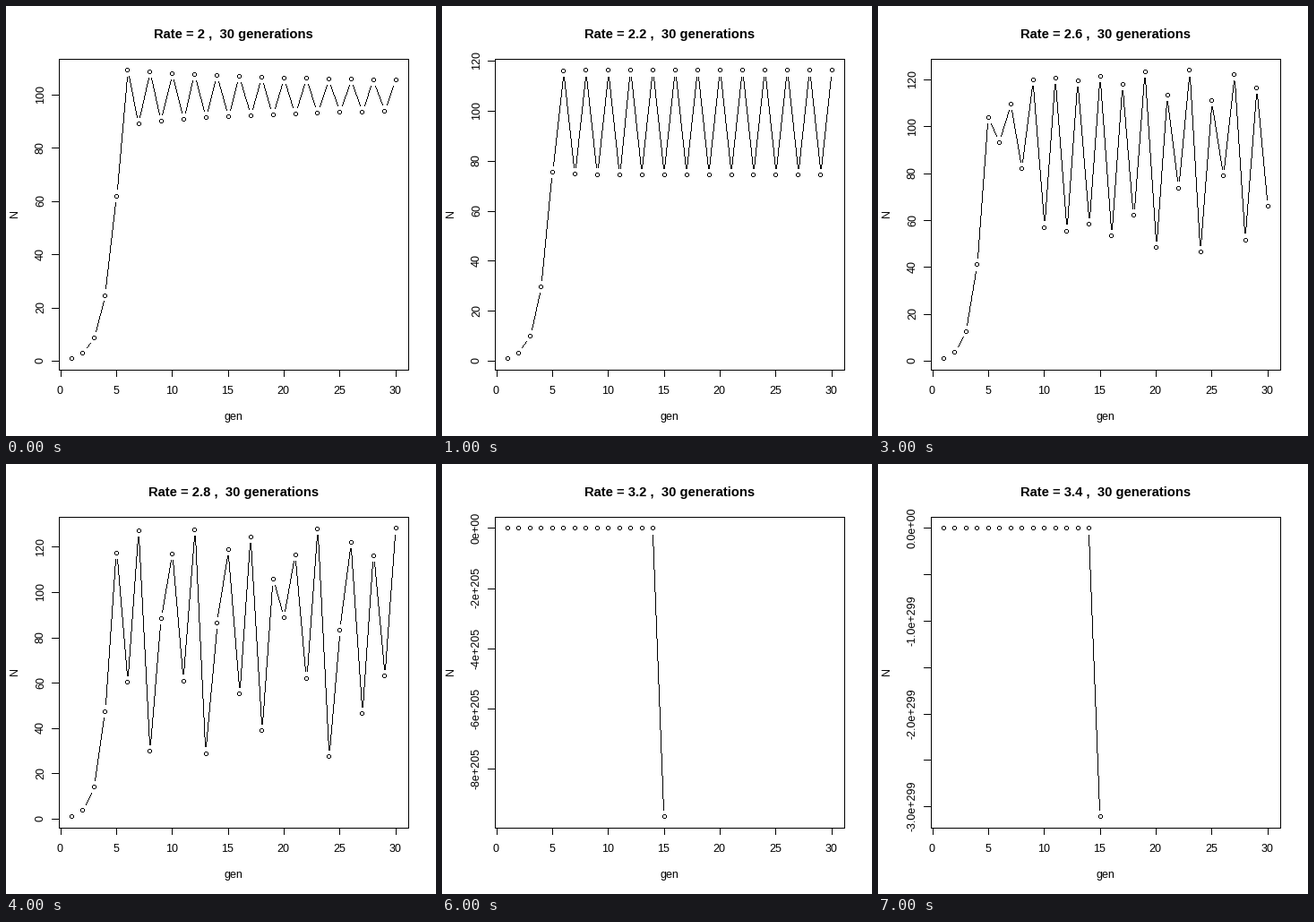
Recreate the animation shown at these times as a matplotlib script. Size 480 by 480 pixels, loop 8 s.

```python
import math

import matplotlib.pyplot as plt
import numpy as np
from matplotlib.animation import FuncAnimation
from matplotlib.collections import PolyCollection

SIZE = 480
LEFT, RIGHT, TOP, BOTTOM = 59.04, 449.76, 59.04, 406.56
GENS = 30
CAPACITY = 100
TICK = 7.2
GAP = 7.2          # space kept free between a marker and its line
PX = 0.9           # points per pixel at 80 dpi
SQUARE = np.array([(0, 0), (1, 0), (1, 1), (0, 1)])
RING = np.array([(x, y) for x in range(-2, 3) for y in range(-2, 3)
                 if max(abs(x), abs(y)) == 2 and abs(x) + abs(y) < 4])

plt.rcParams["font.family"] = "Liberation Sans"
fig = plt.figure(figsize=(6, 6), dpi=80, facecolor="white")
ax = fig.add_axes([0, 0, 1, 1])


def population(rate):
    """Discrete logistic growth, cut off where it overflows."""
    sizes = [1.0]
    while len(sizes) < GENS:
        n = sizes[-1]
        n += rate * n * (1 - n / CAPACITY)
        if not math.isfinite(n):
            break
        sizes.append(n)
    return sizes


def padded(lo, hi):
    pad = 0.04 * (hi - lo)
    return lo - pad, hi + pad


def nice_step(span):
    cell = span / 5
    base = 10.0 ** math.floor(math.log10(cell))
    step = base
    for factor, bias in ((2, 0.8), (5, 1.7), (10, 0.8)):
        if factor * base - cell < bias * (cell - step):
            step = factor * base
    return step


def ticks(lo, hi):
    step = nice_step(hi - lo)
    return [k * step for k in range(math.ceil(lo / step), math.floor(hi / step) + 1)]


def tick_labels(values):
    if abs(values[0]) < 1e5:
        return [f"{v:g}" for v in values]
    step = values[1] - values[0]
    if f"{step:.0e}".startswith("5"):
        # labels too wide for every tick: keep every other one
        return [f"{v:.1e}" if i % 2 == 0 else "" for i, v in enumerate(values)]
    return [f"{v:.0e}" for v in values]


def line(start, end):
    """Whole pixels of a one-pixel line without smoothing."""
    a, b = np.floor(start), np.floor(end)
    count = int(np.abs(b - a).max()) + 1
    return np.rint(np.linspace(a, b, count))


def links(points):
    out = []
    for p, q in zip(points, points[1:]):
        p, q = np.array(p), np.array(q)
        length = math.hypot(*(q - p))
        if length > 2 * GAP:
            inset = (q - p) * GAP / length
            out.append(line(p + inset, q - inset))
    return out


def paint(parts):
    pixels = np.unique(np.concatenate(parts), axis=0)
    ax.add_collection(PolyCollection(pixels[:, None] + SQUARE, facecolors="black",
                                     edgecolors="none", linewidths=0, snap=False))


def text(x, y, s, size=12.5, **kw):
    ax.text(x, y, s, fontsize=size * PX, ha="center", va="baseline",
            rotation_mode="anchor", **kw)


def draw(i):
    ax.clear()
    ax.set_xlim(0, SIZE)
    ax.set_ylim(SIZE, 0)
    ax.axis("off")

    rate = round(2 + 0.2 * i, 1)
    sizes = population(rate)
    xlo, xhi = padded(1, GENS)
    ylo, yhi = padded(min(sizes), max(sizes))

    def px(g):
        return LEFT + (g - xlo) / (xhi - xlo) * (RIGHT - LEFT)

    def py(n):
        return BOTTOM - (n - ylo) / (yhi - ylo) * (BOTTOM - TOP)

    corners = [(LEFT, TOP), (RIGHT, TOP), (RIGHT, BOTTOM), (LEFT, BOTTOM), (LEFT, TOP)]
    parts = [line(a, b) for a, b in zip(corners, corners[1:])]

    for g in range(0, GENS + 1, 5):
        x = px(g)
        parts.append(line((x, BOTTOM), (x, BOTTOM + TICK)))
        text(x - 0.8, 433, str(g))

    values = ticks(ylo, yhi)
    for v, label in zip(values, tick_labels(values)):
        y = py(v)
        parts.append(line((LEFT, y), (LEFT - TICK, y)))
        text(42, y - 0.8, label, rotation=90)

    points = [(px(g), py(n)) for g, n in enumerate(sizes, 1)]
    parts += links(points)
    parts += [np.floor(p) + RING for p in points]
    paint(parts)

    mid_x, mid_y = (LEFT + RIGHT) / 2, (TOP + BOTTOM) / 2
    text(mid_x - 0.8, 36, f"Rate = {rate:g} ,  {GENS} generations", 14.8, weight="bold")
    text(mid_x - 0.8, 462, "gen")
    text(13, mid_y - 0.8, "N", rotation=90)
    return []


anim = FuncAnimation(fig, draw, frames=8, init_func=lambda: [], interval=1000,
                     repeat=True, repeat_delay=0)
plt.show()
```
